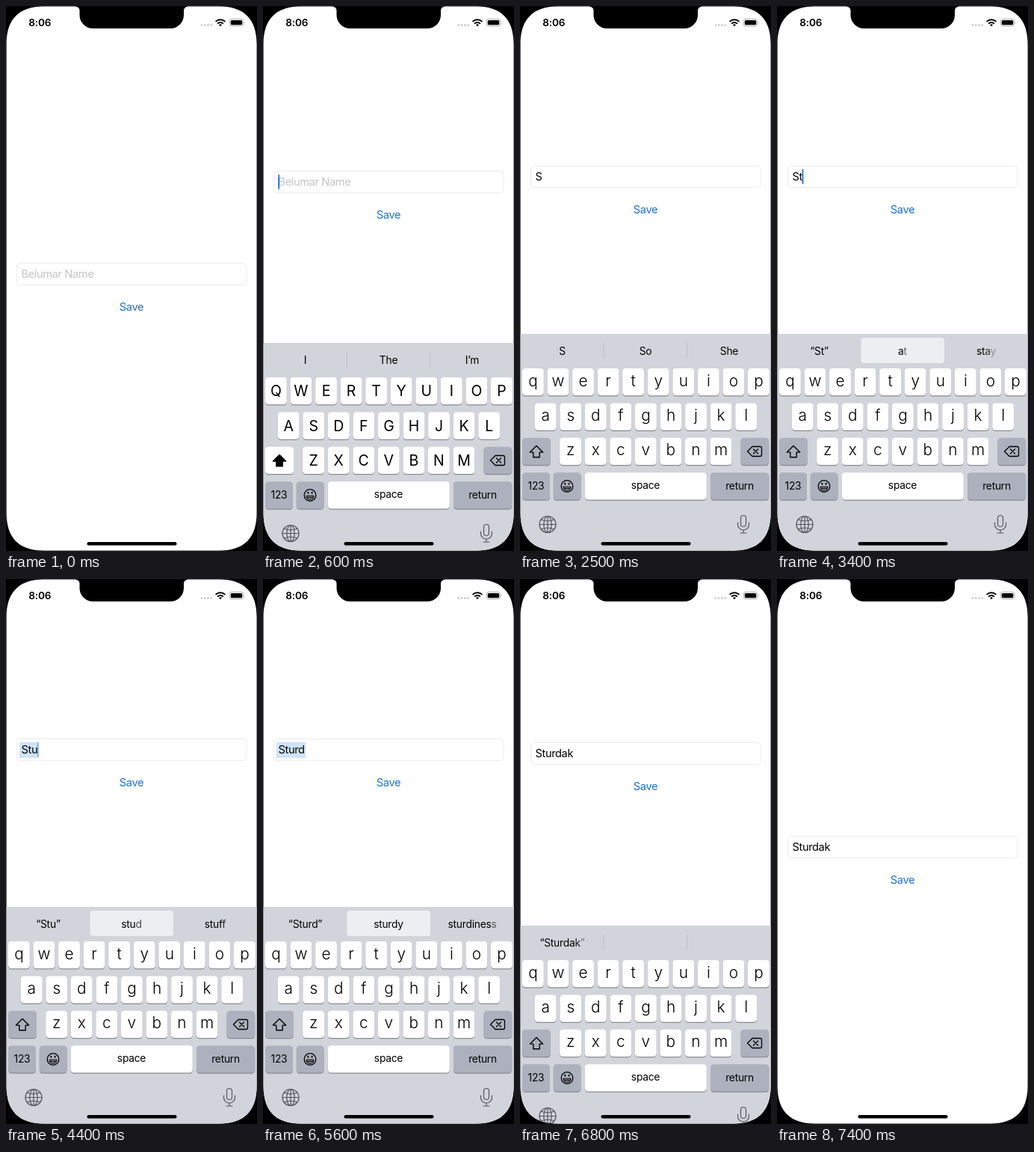
Recreate the animation shown at these times as an HTML page. Size 336 by 728 pixels, loop 8000 ms.

```html
<!DOCTYPE html>
<html lang="en">
<head>
<meta charset="utf-8">
<title>Name form</title>
<style>
html, body { margin: 0; width: 100%; height: 100%; overflow: hidden; background: #000; }
svg { display: block; width: 336px; height: 728px; }
text { font-family: Inter, Roboto, sans-serif; }
.body { font-size: 14.65px; letter-spacing: -0.4px; }
.mid { text-anchor: middle; }
.small { font-size: 13.8px; letter-spacing: -0.25px; }
</style>
</head>
<body>
<svg viewBox="0 0 336 728">
  <defs><clipPath id="screen"><path id="outline"/></clipPath></defs>
  <rect width="336" height="728"/>
  <g clip-path="url(#screen)">
    <rect width="336" height="728" fill="#fff"/>
    <g id="form">
      <rect x="14.5" y="343.5" width="307.5" height="29" rx="4.5" fill="#fff" stroke="#ebebeb"/>
      <rect id="mark" x="18" y="348" height="21" fill="#cfe4fa"/>
      <text id="hint" class="body" x="20.5" y="363.3" fill="#c5c5c7">Belumar Name</text>
      <text id="typed" class="body" x="20.5" y="363.3"></text>
      <rect id="caret" y="348" width="1.8" height="20" rx="0.9" fill="#2273d4"/>
      <text id="save" class="body mid" x="168" y="407.3" fill="#1a73d2">Save</text>
    </g>
    <g id="board">
      <rect y="438" width="336" height="300" fill="#d1d4da"/>
      <rect id="pick" x="112.5" y="443" width="111.5" height="34" rx="4" fill="#eceef1"/>
      <path id="bars" d="M112 450v21M223.5 450v21" stroke="#bcbfc5"/>
      <g id="words"></g>
      <g id="keys"></g>
      <path id="shift" d="M22 587.5l8.6 8.6h-4.4v6.6h-8.4v-6.6h-4.4z" stroke="#000" stroke-width="1.4" stroke-linejoin="round"/>
      <g fill="none" stroke="#000" stroke-width="1.3" stroke-linejoin="round" stroke-linecap="round">
        <path d="M311 588.5h10.5q2 0 2 2v9q0 2-2 2H311l-6.5-6.5z"/>
        <path d="M312.5 592l6 6m0-6l-6 6"/>
        <circle cx="63" cy="641.5" r="7.8"/>
        <path d="M58 642.3h10a5 4.8 0 0 1-10 0zM58.8 644.4h8.4" stroke-width="1.1"/>
        <path d="M60.4 637.6v1.2m5.2-1.2v1.2" stroke-width="1.8"/>
      </g>
      <g class="small mid">
        <text class="small" x="21.5" y="646.4">123</text>
        <text class="small" x="168" y="645">space</text>
        <text class="small" x="294" y="646.4">return</text>
      </g>
      <g fill="none" stroke="#53565d" stroke-width="1.2" stroke-linecap="round">
        <circle cx="37" cy="692.5" r="11"/>
        <ellipse cx="37" cy="692.5" rx="5.2" ry="11"/>
        <path d="M37 681.5v22M26 692.5h22M28.5 686q8.5 4 17 0M28.5 699q8.5-4 17 0"/>
        <rect x="295.5" y="680.5" width="7" height="15" rx="3.5"/>
        <path d="M291.5 690v2.5a7.5 7.5 0 0 0 15 0V690M299 700v4m-4 0h8"/>
      </g>
      <g id="popup">
        <path id="bubble" fill="#fff" stroke="#b4b7bd" stroke-width=".7"/>
        <text id="big" class="mid" font-size="31"></text>
      </g>
    </g>
    <rect x="108.5" y="716" width="120" height="4.5" rx="2.25"/>
    <text x="30.3" y="27.4" font-size="13.6" font-weight="600" letter-spacing="-.2">8:06</text>
    <path d="M262 25.6h14" stroke="#c3c3c6" stroke-width="2.6" stroke-linecap="round" stroke-dasharray="0 4.2"/>
    <g fill="none" stroke="#000" stroke-width="2">
      <path d="M280.6 20.9a9.2 9.2 0 0 1 12.8 0M283.1 23.6a5.6 5.6 0 0 1 7.8 0"/>
      <path d="M287 27.2l-2-2.1a2.9 2.9 0 0 1 4 0z" fill="#000" stroke="none"/>
    </g>
    <rect x="299.3" y="17.4" width="18.4" height="9.4" rx="2.8" fill="none" stroke="#a5a5a7" stroke-width=".9"/>
    <rect x="300.8" y="18.9" width="15.4" height="6.4" rx="1.6"/>
    <path d="M319 20.5q1.4 1.6 0 3.2z" fill="#a5a5a7"/>
  </g>
  <path d="M93.5 0v1a5 5 0 0 1 5 5v6a18 18 0 0 0 18 18h103.500a18 18 0 0 0 18-18V6a5 5 0 0 1 5-5V0z"/>
</svg>
<script>
const $ = id => document.getElementById(id);
const LOOP = 8000, STEP = 100;
const NAME = 'Sturdak';
const presses = [2000, 3100, 4000, 4500, 5000, 5700, 6330];
const LOWER = 2200, SAVE = 6600, CLOSE = 6773.4;

// left, middle and right suggestion after each letter
const offers = [
  ['I', 'The', 'I’m'],
  ['S', 'So', 'She'],
  ['“St”', 'at', 'stay'],
  ['“Stu”', 'stud', 'stuff'],
  ['“Stur”', 'stir', 'sturdy'],
  ['“Sturd”', 'sturdy', 'sturdiness'],
  ['“Sturda”', 'sturdy', ''],
  ['“Sturdak”', '', '']
];
const lead = [130, 0, 60];

const clamp = v => Math.max(0, Math.min(1, v));

// critically damped spring
function spring(ms) {
  const x = Math.max(0, ms) * 0.01826;
  return 1 - (1 + x) * Math.exp(-x);
}

function make(tag, parent, attrs) {
  const el = document.createElementNS('http://www.w3.org/2000/svg', tag);
  for (const k in attrs) el.setAttribute(k, attrs[k]);
  parent.appendChild(el);
  return el;
}

// screen edge with smooth corners: e is the corner's reach, c its pull
function smoothRect(x, y, w, h, e, c) {
  const a = e - c;
  return `M${x + e} ${y}h${w - 2 * e}c${c} 0 ${e} ${a} ${e} ${e}v${h - 2 * e}` +
    `c0 ${c} ${-a} ${e} ${-e} ${e}h${2 * e - w}c${-c} 0 ${-e} ${-a} ${-e} ${-e}` +
    `v${2 * e - h}c0 ${-c} ${a} ${-e} ${e} ${-e}z`;
}
$('outline').setAttribute('d', smoothRect(0.6, 0.6, 335, 727, 50, 33));

function addKey(x, y, w, fill) {
  make('rect', $('keys'), { x, y: y + 1, width: w, height: 36.5, rx: 4.2, fill: '#898c92' });
  return make('rect', $('keys'), { x, y, width: w, height: 36.3, rx: 4.2, fill });
}

const GREY = '#adb1bd', PITCH = 33.56, WIDE = 28.8;
const keys = {};
[['qwertyuiop', 3, 484], ['asdfghjkl', 19.8, 530.4], ['zxcvbnm', 53.2, 576.8]].forEach(([row, x0, y]) => {
  [...row].forEach((c, i) => {
    const x = x0 + i * PITCH;
    addKey(x, y, WIDE, '#fff');
    keys[c] = { x, y, label: make('text', $('keys'), { x: x + WIDE / 2, class: 'mid' }) };
  });
});
const shiftKey = addKey(3, 576.8, 38, GREY);
addKey(295.5, 576.8, 37.7, GREY);
addKey(3, 623.2, 37, GREY);
addKey(44.8, 623.2, 36.7, GREY);
addKey(86.8, 623.2, 163, '#fff');
addKey(255, 623.2, 78.2, GREY);

const slots = [56.5, 168, 280].map(x => make('text', $('words'), { x, y: 465.6, class: 'small mid' }));

function setCase(upper) {
  for (const c in keys) {
    const { y, label } = keys[c];
    label.textContent = upper ? c.toUpperCase() : c;
    label.setAttribute('y', y + (upper ? 25.4 : 23.6));
    label.setAttribute('font-size', upper ? 19.5 : 20.8);
    label.setAttribute('font-weight', upper ? 400 : 350);
  }
  shiftKey.setAttribute('fill', upper ? '#fff' : GREY);
  $('shift').setAttribute('fill', upper ? '#000' : 'none');
}

function setWords(stage, age) {
  slots.forEach((slot, n) => {
    slot.textContent = '';
    [...offers[stage][n]].forEach((c, i) => {
      const shown = stage ? clamp((age + lead[n] - i * 45) / 110) : 1;
      make('tspan', slot, { 'fill-opacity': shown }).textContent = c;
    });
  });
  const picked = stage > 1 && stage < 7;
  $('pick').setAttribute('opacity', picked ? 1 : 0);
  $('bars').setAttribute('opacity', picked ? 0 : 1);
  return picked;
}

function setPopup(c, upper) {
  $('popup').setAttribute('opacity', c ? 1 : 0);
  if (!c) return;
  const { x, y } = keys[c];
  $('bubble').setAttribute('d', `M${x - 13} ${y - 47}q0-8 8-8h${WIDE + 10}q8 0 8 8v29` +
    `c0 12-13 10-13 22v28q0 4-4 4h${8 - WIDE}q-4 0-4-4v-28c0-12-13-10-13-22z`);
  const big = $('big');
  big.textContent = upper ? c.toUpperCase() : c;
  big.setAttribute('x', x + WIDE / 2);
  big.setAttribute('y', y - 20);
}

function blink(age) {
  const c = age < 0 ? 0 : age % 1000;
  if (c < 400 || c >= 800) return 1;
  return c < 500 || c >= 700 ? 0.5 : 0;
}

function draw(t) {
  const count = presses.filter(p => p <= t).length;
  const last = count ? presses[count - 1] : 800;
  const age = t - last;
  const upper = t < LOWER;
  const rise = spring(t - 330) - spring(t - CLOSE);
  const lift = spring(t - 345) - spring(t - CLOSE - 10);
  $('board').setAttribute('transform', `translate(0 ${Math.round(290 * (1 - rise))})`);
  $('board').setAttribute('visibility', rise > 0.001 ? 'visible' : 'hidden');
  $('form').setAttribute('transform', `translate(0 ${-Math.round(130 * lift)})`);

  setCase(upper);
  const stage = count && age < 190 ? count - 1 : count;
  const picked = setWords(stage, stage < count ? 2000 : age - 190);
  const hold = count === 6 ? 300 : 200;
  setPopup(count && age < hold ? NAME[count - 1].toLowerCase() : '', upper);

  const typed = $('typed');
  typed.textContent = NAME.slice(0, count);
  $('hint').setAttribute('opacity', count ? 0 : 1);
  const width = count ? typed.getComputedTextLength() : 0;
  $('mark').setAttribute('width', width + 4);
  $('mark').setAttribute('opacity', picked && age >= 400 ? 1 : 0);
  const focused = t >= 400 && t < CLOSE;
  $('caret').setAttribute('x', 20.2 + width);
  $('caret').setAttribute('opacity', focused ? blink(age) : 0);
  $('save').setAttribute('opacity', t >= SAVE && t < SAVE + 200 ? 0.3 + (t - SAVE) / 400 : 1);
}

const start = performance.now();
function tick() {
  const t = (performance.now() - start) % LOOP;
  draw(Math.floor(t / STEP) * STEP);
  requestAnimationFrame(tick);
}
tick();
</script>
</body>
</html>
```
